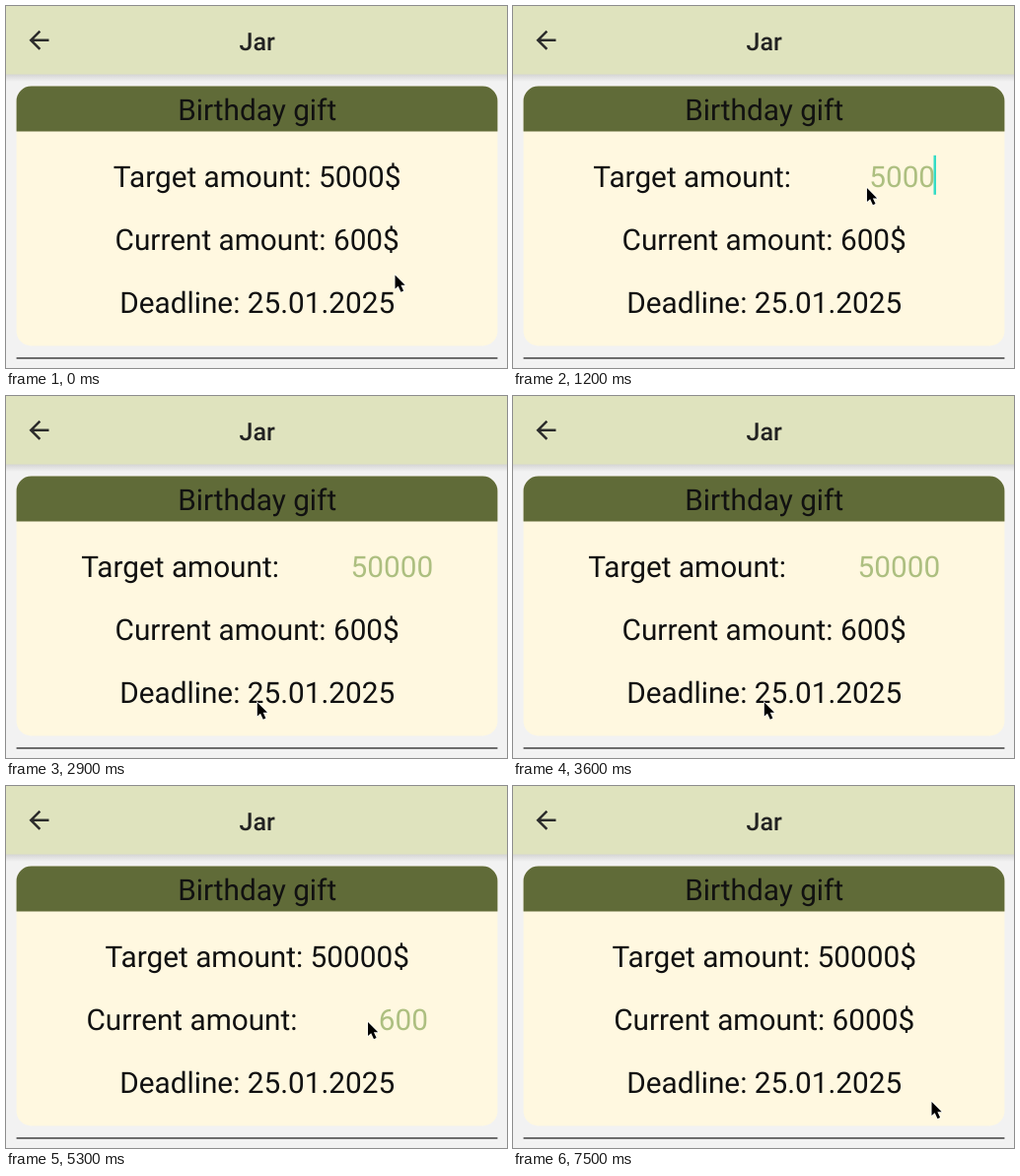
Animation of 508x368 px, one loop 8200 ms. Source, as an HTML page:

```html
<!DOCTYPE html>
<html lang="en">
<head>
<meta charset="utf-8">
<title>Jar</title>
<style>
  html, body { margin: 0; width: 100%; height: 100%; overflow: hidden; background: #f2f2f2; }
  #stage { display: block; width: 508px; height: 368px; }
  text { font: 29.75px Roboto, sans-serif; fill: #111; text-rendering: geometricPrecision; }
  .mid { text-anchor: middle; }
  .bar { font-size: 25px; font-weight: 500; fill: #222; }
  .value { text-anchor: end; fill: #adbf80; }
</style>
</head>
<body>
<svg id="stage" viewBox="0 0 508 368">
  <defs>
    <linearGradient id="shadow" x2="0" y2="1">
      <stop stop-color="#000" stop-opacity=".13"/>
      <stop offset="1" stop-color="#000" stop-opacity="0"/>
    </linearGradient>
  </defs>
  <rect width="508" height="368" fill="#f2f2f2"/>
  <rect y="69" width="508" height="8" fill="url(#shadow)"/>
  <rect width="508" height="69.5" fill="#dfe3be"/>
  <path transform="translate(18.5 19.7) scale(1.25)" fill="#2b2b2b"
    d="M20 11H7.83l5.59-5.59L12 4l-8 8 8 8 1.41-1.41L7.83 13H20z"/>
  <text class="mid bar" x="254.7" y="44.7">Jar</text>

  <rect x="10.6" y="81.6" width="487.8" height="263.8" rx="15" fill="#fff8e0"/>
  <path d="M10.6 127.5V96.6a15 15 0 0 1 15-15H483.4a15 15 0 0 1 15 15V127.5z" fill="#606b38"/>
  <text class="mid" x="254.7" y="116">Birthday gift</text>
  <text id="target" y="183.5"/>
  <text id="current" y="248"/>
  <text class="mid" x="254.7" y="312.3">Deadline: 25.01.2025</text>
  <rect x="10.6" y="357" width="487.8" height="2" fill="#6c6c6c"/>

  <svg id="field" height="368"><text id="value" class="value"/></svg>
  <rect id="caret" width="2.5" height="40" fill="#34dcc6"/>
  <path id="pointer" d="M0 0V14L3.2 11.2 6 17.2 8.6 16 5.9 10.3H10.2z"
    stroke="#fff" stroke-width="1.2" paint-order="stroke"/>
</svg>
<script>
const LOOP = 8200, STEP = 100, CENTER = 254.7;
const el = id => document.getElementById(id);
const set = (node, attrs) => {
  for (const key in attrs) node.setAttribute(key, attrs[key]);
};

// Each state: start time, value, left edge of the label, visible field width
const rows = [
  { node: el('target'), y: 183.5, label: 'Target amount:', before: '5000', after: '50000', end: 3900,
    states: [[700, '5000', 95.5, 25], [800, '5000', 81.3, 120], [2000, '50000', 76.2, 120]] },
  { node: el('current'), y: 248, label: 'Current amount:', before: '600', after: '6000', end: 7300,
    states: [[4700, '600', 89.5, 25], [4800, '600', 81.5, 120], [5900, '6000', 76.2, 120]] }
];

// Pointer moves: start, end, destination
const home = [394.5, 273.5];
const moves = [
  [0, 600, 372.7, 178.7],
  [1000, 1400, 345.2, 191.5],
  [2400, 2900, 254.8, 311.5],
  [3900, 4500, 367, 240],
  [6200, 6600, 424.5, 321]
];

function pointerAt(t) {
  let [x, y] = home;
  for (const [start, end, toX, toY] of moves) {
    const p = Math.min(1, Math.max(0, (t - start) / (end - start)));
    const eased = p * p * (3 - 2 * p);
    x += (toX - x) * eased;
    y += (toY - y) * eased;
  }
  return `translate(${x} ${y})`;
}

function drawRow(row, t) {
  const state = t < row.end && row.states.filter(s => t >= s[0]).pop();
  if (!state) {
    row.node.textContent = `${row.label} ${t < row.end ? row.before : row.after}$`;
    set(row.node, { x: CENTER, 'text-anchor': 'middle' });
    return false;
  }
  const [start, value, left, width] = state;
  const right = 2 * CENTER - left;
  row.node.textContent = row.label;
  set(row.node, { x: left, 'text-anchor': 'start' });
  el('value').textContent = value;
  set(el('value'), { x: width, y: row.y });
  set(el('field'), { x: right - width, width });
  const caretOn = (t - start) % 1000 < 500;
  set(el('caret'), { x: right - 1.6, y: row.y - 31.7, visibility: caretOn ? 'visible' : 'hidden' });
  return true;
}

function draw() {
  const t = Math.floor(performance.now() % LOOP / STEP) * STEP;
  const editing = rows.map(row => drawRow(row, t)).includes(true);
  set(el('field'), { visibility: editing ? 'visible' : 'hidden' });
  if (!editing) set(el('caret'), { visibility: 'hidden' });
  set(el('pointer'), { transform: pointerAt(t) });
  requestAnimationFrame(draw);
}
draw();
</script>
</body>
</html>
```
